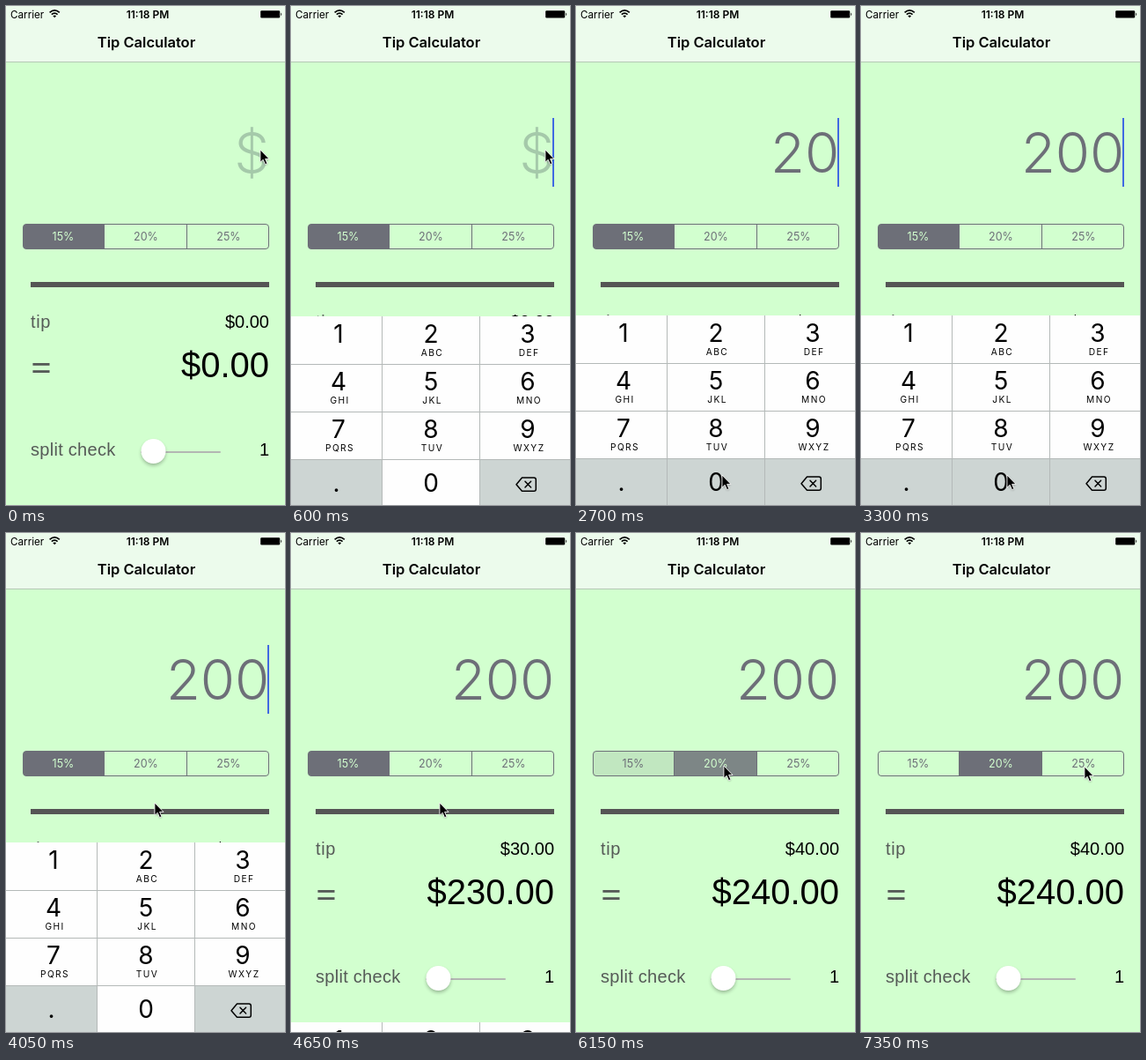
An HTML page for the animation above (8000 ms loop, 317 by 566 pixels).

```html
<!DOCTYPE html>
<html lang="en">
<head>
<meta charset="utf-8">
<title>Tip Calculator</title>
<style>
  html, body { margin: 0; width: 100%; height: 100%; overflow: hidden; background: #d2ffcf; }
  svg { display: block; width: 317px; height: 566px; }
  text { font-family: Inter, "Open Sans", sans-serif; }
  .label, .value { font-family: "Liberation Sans", Arial, sans-serif; font-size: 20px; }
  .label { fill: #555a57; }
  .equals { font-family: "Open Sans", sans-serif; font-size: 42px; }
  .value { text-anchor: end; }
  .total { font-size: 40px; }
  .amount { font-size: 63.5px; font-weight: 360; text-anchor: end; }
  .seg { font-size: 12.5px; text-anchor: middle; }
  .digit { font-size: 28px; text-anchor: middle; }
  .letters { font-size: 10.2px; letter-spacing: 1.4px; text-anchor: middle; }
</style>
</head>
<body>
<svg viewBox="0 0 317 566" xmlns="http://www.w3.org/2000/svg">
  <defs>
    <clipPath id="pill"><rect x="19.5" y="247.5" width="279" height="28" rx="3.5"/></clipPath>
    <filter id="soft" x="-50%" y="-50%" width="200%" height="200%"><feGaussianBlur stdDeviation="2.2"/></filter>
    <filter id="faint" x="-50%" y="-50%" width="200%" height="200%"><feGaussianBlur stdDeviation=".8"/></filter>
  </defs>
  <rect width="317" height="566" fill="#d2ffcf"/>

  <!-- status and title bars -->
  <rect width="317" height="63" fill="#ecfbec"/>
  <rect y="63" width="317" height="1" fill="#b5c8b5"/>
  <text x="5" y="13.5" font-size="11.7">Carrier</text>
  <g fill="none" stroke="#000" stroke-width="1.7">
    <path d="M49.6 7.4Q55.2 2.4 60.8 7.4"/>
    <path d="M51.8 9.7Q55.2 6.6 58.6 9.7"/>
  </g>
  <path d="M53.3 11.2Q55.2 9.6 57.1 11.2L55.2 13.2Z"/>
  <text x="161" y="13.5" font-size="12" font-weight="600" text-anchor="middle">11:18 PM</text>
  <rect x="289.2" y="5.3" width="22" height="8.2" rx="1.2"/>
  <path d="M312.3 7.6Q314.2 9.4 312.3 11.2Z"/>
  <text x="159.5" y="47" font-size="16.5" font-weight="600" text-anchor="middle">Tip Calculator</text>

  <!-- bill amount -->
  <text class="amount" id="amount" x="299.3" y="189"></text>
  <rect id="caret" x="297" y="127" width="2" height="78" fill="#4069e2"/>

  <!-- tip rate -->
  <g id="rates" clip-path="url(#pill)"></g>
  <path d="M111.5 248V275M205.5 248V275" stroke="#6d6f78"/>
  <rect x="19.5" y="247.5" width="279" height="28" rx="3.5" fill="none" stroke="#6d6f78"/>

  <!-- results -->
  <rect x="28" y="313" width="271" height="6" fill="#555555"/>
  <text class="label" x="28" y="365" letter-spacing=".6">tip</text>
  <text class="label equals" x="28" y="425">=</text>
  <text class="value" id="tip" x="299" y="365"></text>
  <text class="value total" id="total" x="299" y="421"></text>
  <text class="label" x="28" y="510" letter-spacing=".28">split check</text>
  <rect x="153" y="505" width="91" height="2" rx="1" fill="#b3b6b3"/>
  <circle cx="167.5" cy="507.5" r="13.5" fill="#000" opacity=".3" filter="url(#soft)"/>
  <circle cx="167.5" cy="505" r="14" fill="#fff"/>
  <text class="value" x="299" y="510">1</text>

  <g id="pad"></g>

  <g id="mouse">
    <path d="M1.5 2.5V16L4.5 13.3 6.7 18.4 9 17.4 6.8 12.4H11Z" opacity=".35" filter="url(#faint)"/>
    <path d="M.9 1V15.3L4.2 12.3 6.5 17.7 8.9 16.7 6.6 11.4H11Z" stroke="#fff" stroke-width=".9"/>
  </g>
</svg>
<script>
const LOOP = 8000, TICK = 150;
const GRAY = '#6d6f78', MINT = '#d2ffcf', KEY = '#fefefe', KEY_DOWN = '#cdd5d3';
const $ = id => document.getElementById(id);
const clamp = v => Math.min(1, Math.max(0, v));

// The story: open the pad, type, close it, pick another rate
const OPEN = 300, CLOSE = 4505, PICK = 6000;
const taps = [{ at: 1950, key: '2' }, { at: 2700, key: '0' }, { at: 3150, key: '0' }];
const home = [288, 162];
const moves = [
  { at: 600, ms: 750, to: [167, 385] },
  { at: 2100, ms: 600, to: [165, 531] },
  { at: 3300, ms: 650, to: [168, 305] },
  { at: 5100, ms: 450, to: [167, 263] },
  { at: 6300, ms: 1050, to: [253, 264] },
];

function mouseAt(t) {
  return moves.reduce((pos, { at, ms, to }) => {
    const ease = 1 - (1 - clamp((t - at) / ms)) ** 2;
    return pos.map((v, i) => v + (to[i] - v) * ease);
  }, home).map(Math.round);
}

// Distance the pad hangs below its open place
function padDrop(t) {
  const travel = 218, away = since => Math.exp(-Math.max(0, since) / 53);
  return Math.round(travel * (t < CLOSE ? away(t - OPEN) : 1 - away(t - CLOSE)));
}

// Solid, then a short fade; each tap restarts the blink
function caretAlpha(t, typed) {
  if (t <= OPEN || t >= CLOSE) return 0;
  const last = typed.length ? typed.at(-1).at : OPEN;
  return clamp((750 - (t - last) % 900) / 300);
}

// Rate segments
$('rates').innerHTML = ['15%', '20%', '25%'].map((label, i) =>
  `<rect x="${18.5 + 93.5 * i}" y="247" width="93.5" height="29" fill="${GRAY}"/>
   <text class="seg" x="${65 + 94 * i}" y="266">${label}</text>`).join('');
const segRects = $('rates').querySelectorAll('rect');
const segTexts = $('rates').querySelectorAll('text');

// Number pad
const keys = ['1', '2 ABC', '3 DEF', '4 GHI', '5 JKL', '6 MNO', '7 PQRS', '8 TUV', '9 WXYZ', '.', '0', ''];
$('pad').innerHTML = keys.map((key, i) => {
  const [digit, letters = ''] = key.split(' ');
  const col = i % 3, row = Math.floor(i / 3), last = row === 3;
  const left = [0, 104, 215][col], y = 351 + 54 * row;
  const mid = 54 + 107 * col - (col === 1 ? 2 : 0) + (col === 2 ? 1 : 0);
  return `<rect data-key="${digit}" x="${left}" y="${y}" width="${317 - left}" height="54" fill="${last && col !== 1 ? KEY_DOWN : KEY}"/>
    <text class="digit" x="${digit === '.' ? mid - 2.5 : mid}" y="${y + (last ? 37 : 30)}">${digit}</text>
    <text class="letters" x="${mid + 1.5}" y="${y + 45}">${letters}</text>`;
}).join('') +
  `<path d="M0 405.5H317M0 459.5H317M0 513.5H317M103.5 351V566M214.5 351V566" stroke="#b4b9b8"/>
   <g fill="none" stroke="#000" stroke-width="1.5" stroke-linejoin="round" stroke-linecap="round">
     <path d="M262.5 534H276Q278.3 534 278.3 536.3V547Q278.3 549.3 276 549.3H262.5L256 541.7Z"/>
     <path d="M266 538.3L272.6 545M272.6 538.3L266 545"/>
   </g>`;
const tapKeys = ['2', '0'].map(k => $('pad').querySelector(`[data-key="${k}"]`));

const money = v => '$' + v.toFixed(2);
const move = (el, x, y) => el.setAttribute('transform', `translate(${x} ${y})`);

function draw(time) {
  const t = Math.floor(time / TICK) * TICK;
  const typed = taps.filter(tap => tap.at <= t);
  const bill = Number(typed.map(tap => tap.key).join(''));
  const down = typed.find(tap => t < tap.at + 300)?.key;
  const picked = clamp((t - PICK) / 180), rate = picked ? .2 : .15;

  $('amount').textContent = bill || '$';
  $('amount').setAttribute('fill', bill ? GRAY : '#a5c9aa');
  $('tip').textContent = money(bill * rate);
  $('total').textContent = money(bill * (1 + rate));
  $('caret').setAttribute('opacity', caretAlpha(t, typed));
  [1 - picked, picked, 0].forEach((alpha, i) => {
    segRects[i].setAttribute('opacity', alpha);
    segTexts[i].setAttribute('fill', alpha > .5 ? MINT : GRAY);
  });
  tapKeys.forEach(k => k.setAttribute('fill', k.dataset.key === down ? KEY_DOWN : KEY));
  move($('pad'), 0, padDrop(t));
  move($('mouse'), ...mouseAt(t));
}

const start = performance.now();
function frame() {
  draw((performance.now() - start) % LOOP);
  requestAnimationFrame(frame);
}
frame();
</script>
</body>
</html>
```
